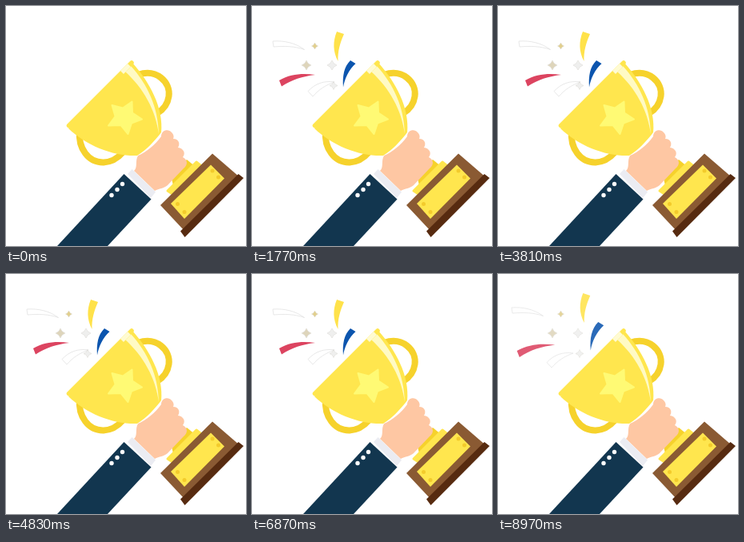
These frames come from a looping animation (300 px wide and 300 px high, 9000 ms). An HTML page without scripts:

```html
<!DOCTYPE html>
<html lang="en">
<head>
<meta charset="utf-8">
<title>Trophy</title>
<style>
@property --t { syntax: "<number>"; inherits: true; initial-value: 0; }
@property --c { syntax: "<number>"; inherits: true; initial-value: 0; }

html, body { margin: 0; width: 100%; height: 100%; overflow: hidden; background: #fff; }
svg { display: block; width: 100%; height: 100%; }

/* --t counts 30 ms ticks, --c counts bursts of 34 ticks */
@keyframes tick { from { --t: 0; } to { --t: 300; } }
@keyframes burst {
  0% { --c: 0; }
  11.333% { --c: 1; }
  22.666% { --c: 2; }
  34% { --c: 3; }
  45.333% { --c: 4; }
  56.666% { --c: 5; }
  68% { --c: 6; }
  79.333% { --c: 7; }
  90.666%, 100% { --c: 8; }
}
.confetti {
  animation: tick 9s steps(300) -1ms infinite, burst 9s step-end -1ms infinite;
  --p: calc(var(--t) - 34 * var(--c));
  --u: clamp(0, (var(--p) - 2) / 23, 1);
  --w: clamp(0, (var(--p) - 27) / 7, 1);
  /* --k: flight out of the cup, --v: drift afterwards */
  --k: calc(var(--u) * (.6 + .4 * var(--u)));
  --v: calc(clamp(0, (var(--p) - 25) / 2, 1) + .8 * var(--w) * (2 - var(--w)));
  --o: calc(clamp(0, var(--p) - 1, 1) * clamp(0, (34 - var(--p)) / 8, 1));
}
.bit {
  --dx: 0; --dy: 0; --g: 0;
  transform-box: fill-box;
  transform-origin: center;
  opacity: var(--o);
  transform:
    translate(
      calc(((114 - var(--x)) * (1 - var(--k)) + var(--dx) * var(--v)) * 1px),
      calc(((108 - var(--y)) * (1 - var(--k)) + var(--dy) * var(--v)) * 1px))
    scale(calc(.2 + .8 * var(--k) + var(--g) * var(--v)));
}
.pale { fill: #fff; stroke: #d9d9d9; stroke-width: .6; }
.star { stroke: #d6d4ce; stroke-width: .5; }

.s1 { --x: 78.5; --y: 50; fill: #e2cf8c; }
.s2 { --x: 68; --y: 74; fill: #ded5bb; }
.s3 { --x: 100; --y: 74; fill: #efefee; }
.s4 { --x: 102; --y: 99.5; fill: #efefee; }
.r1 { --x: 46; --y: 48; --dx: -9; --dy: -2; }
.r2 { --x: 109; --y: 50; --dx: .3; --dy: -8; fill: #ffe24a; }
.r3 { --x: 56; --y: 93; --dx: -9; --dy: 3; --g: .06; fill: #dc4460; }
.r4 { --x: 121; --y: 85; --dx: 2.2; --dy: -7; --g: .06; fill: #0c55ae; }
.r5 { --x: 87; --y: 104; --dx: -9; --dy: 4; }
</style>
</head>
<body>
<svg viewBox="0 0 300 300">
  <g class="confetti">
    <path class="bit pale r1" d="M26 44C40 43 54 46 65.500 54.500C53 50 40 50 27 51Z"/>
    <path class="bit r2" d="M106 32L115 35C110 46 107 57 107.500 69C101 57 101 44 106 32Z"/>
    <path class="bit r3" d="M34 93C48 85 63 84 79 86C63 88 50 92 37 100.500Z"/>
    <path class="bit r4" d="M123 68L129.500 72C121 80 116 90 114 101.500C113 87 115 76 123 68Z"/>
    <path class="bit pale r5" d="M70 106.500C79 97 90 93 103 95C92 99 84 104 76 113Z"/>
    <g transform="translate(78.500 50)"><path class="bit star s1" d="M0-4Q1-1 4 0Q1 1 0 4Q-1 1-4 0Q-1-1 0-4Z"/></g>
    <g transform="translate(68 74)"><path class="bit star s2" d="M0-6Q1.500-1.500 6 0Q1.500 1.500 0 6Q-1.500 1.500-6 0Q-1.500-1.500 0-6Z"/></g>
    <g transform="translate(100 74)"><path class="bit star s3" d="M0-6Q1.500-1.500 6 0Q1.500 1.500 0 6Q-1.500 1.500-6 0Q-1.500-1.500 0-6Z"/></g>
    <g transform="translate(102 99.500)"><path class="bit star s4" d="M0-5Q1-1 5 0Q1 1 0 5Q-1 1-5 0Q-1-1 0-5Z"/></g>
  </g>

  <!-- handles -->
  <g fill="none" stroke="#f6d22c" stroke-width="8">
    <path d="M165 86C188 78 206 95 203.500 113C202 123 196 130 189 134"/>
    <path d="M92 156C90 178 103 196 122 195.500C132 195 140 190 146 183"/>
  </g>

  <!-- cup -->
  <path fill="#ffe64e" d="M157 70C180 95 197 128 194 158C185 170 175 180 164 187C134 188 101 175 78 153Z"/>
  <path fill="#fffac4" d="M149 82L156 75C177 98 190 126 191 160C187 130 172 103 149 82Z"/>
  <path stroke="#ffe64e" stroke-width="5.500" stroke-linecap="round" d="M78.500 149.500L157 71"/>
  <path stroke="#fffbd2" stroke-width="5.500" d="M145 83L154 74"/>
  <path fill="#fffa74" stroke="#fffa74" stroke-width="2" stroke-linejoin="round"
    d="M132.500 124L146 127.500L157.500 119.500L158 133.500L170 141.500L157 146.500L152.500 160L143.500 149L128 149.500L136.500 138Z"/>

  <!-- stem and base -->
  <path fill="#f6d22c" d="M206 211L226 192L237 201L210 229Z"/>
  <path fill="#ffe64e" stroke="#ffe64e" stroke-width="3" stroke-linejoin="round" d="M238 195L243 199L208 235L202 231Z"/>
  <path fill="#8a5a33" d="M258 184.500L291 213L223 281L193 249Z"/>
  <path fill="#572b10" d="M290.500 210L297 215L223.500 289L218 281.500Z"/>
  <path fill="#ffe64e" d="M256 198.500L273 215.500L223 266L206 247Z"/>
  <g fill="#f3cb2c">
    <circle cx="258" cy="206" r="2.500"/><circle cx="265.500" cy="214" r="2.500"/>
    <circle cx="214.500" cy="247.500" r="2.500"/><circle cx="223" cy="257.500" r="2.500"/>
  </g>

  <!-- hand and sleeve -->
  <path fill="#fec7a3" d="M165 187C175 183 187 173 194 163C194 155 203 153 207 158C210 161 210 164 209 166C216 166 218 172 215 177C222 178 225 184 221 189C228 193 227 199 222 203L202 224C198 228 191 228 186 231L160 206C165 202 161 194 165 187Z"/>
  <path fill="#ebecf2" d="M157.500 204L187 232.500L181 240L152 210Z"/>
  <path fill="#12364f" d="M147.500 210L181.500 241.500L127 300H64Z"/>
  <g fill="#fff">
    <circle cx="132" cy="236.500" r="2.700"/><circle cx="139" cy="229.500" r="2.700"/><circle cx="145.500" cy="222.500" r="2.700"/>
  </g>
</svg>
</body>
</html>
```
